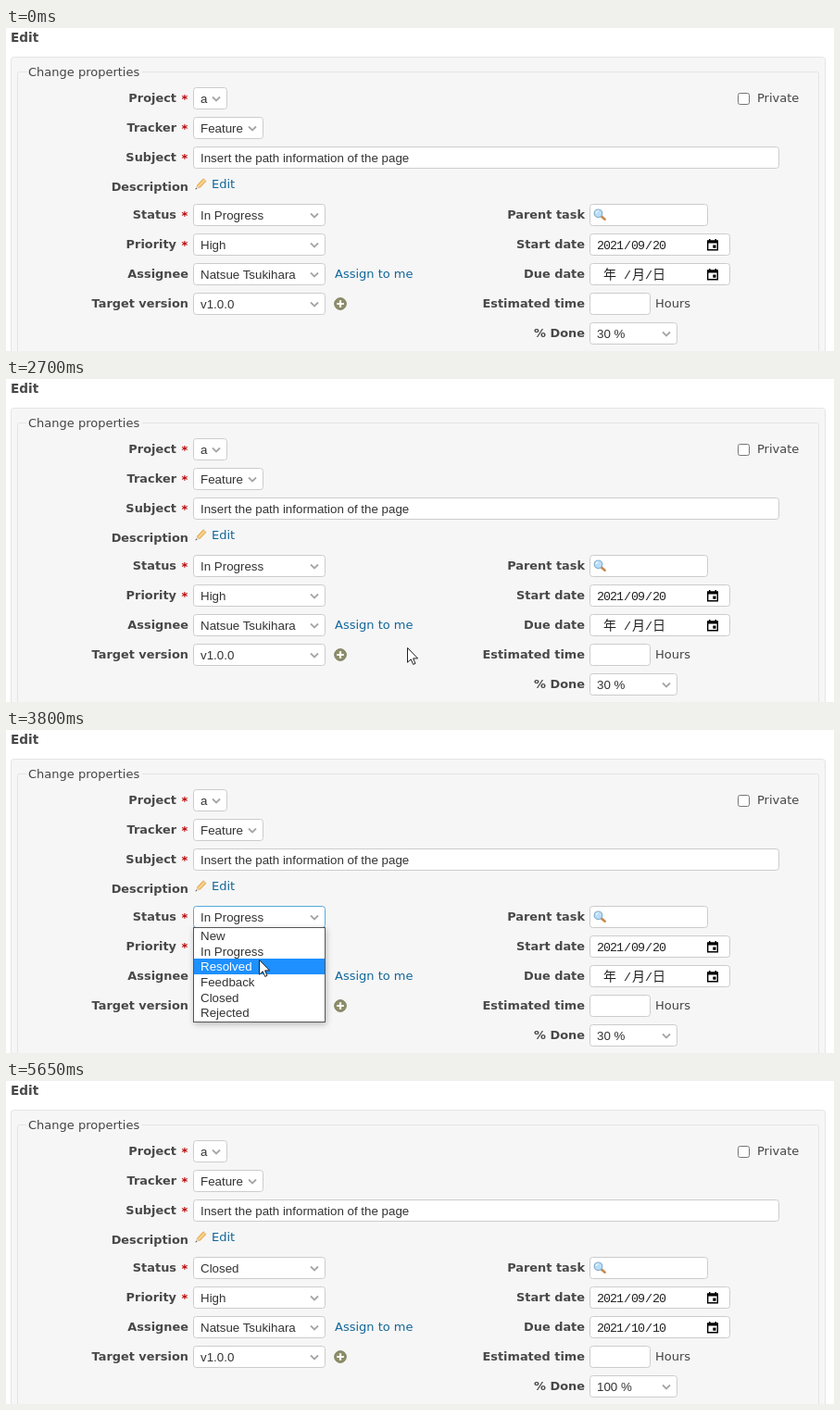
These frames come from a looping animation (894x349 px, 7.05 s). An HTML page:

```html
<!DOCTYPE html>
<html lang="en">
<head>
<meta charset="utf-8">
<title>Edit form</title>
<style>
  html, body { margin: 0; width: 100%; height: 100%; overflow: hidden; background: #fff; }
  svg { display: block; }
  text { white-space: pre; }
  .ui { font: 13px "DejaVu Sans", sans-serif; fill: #444; }
  .label { font: bold 12.9px "DejaVu Sans", sans-serif; fill: #484848; text-anchor: end; }
  .star { font: bold 13px "DejaVu Sans", sans-serif; fill: #b00; text-anchor: middle; }
  .title { font: bold 13.6px "DejaVu Sans", sans-serif; fill: #484848; }
  .link { fill: #169; }
  .value { font: 13.333px "Liberation Sans", Arial, sans-serif; fill: #333; }
  .date { font: 13.333px "Liberation Mono", monospace; letter-spacing: -1px; fill: #222; }
  .kanji { font: 14px "Noto Sans CJK JP", "Noto Sans CJK", sans-serif; fill: #222; }
  .box { fill: #fff; stroke: #ccc; }
  .box.focus { stroke: #5ad; }
  .panel { fill: #f6f6f6; stroke: #e4e4e4; }
  #menu rect.list { fill: #fff; stroke: #555; filter: drop-shadow(1px 2px 3px rgba(0, 0, 0, .25)); }
  #bar { fill: #1e90ff; }
  .value.on { fill: #fff; }
</style>
</head>
<body>
<svg width="894" height="349" viewBox="0 0 894 349">
  <defs>
    <path id="chevron" d="M-4-2 0 2 4-2" fill="none" stroke="#a6a6a6" stroke-width="1.8"/>
    <g id="calendar">
      <path d="M.7 2.7H11.3V12.3H.7Z" fill="none" stroke="#000" stroke-width="1.4"/>
      <path d="M0 2H12V5H0ZM2 .5H3.5V2H2ZM8.5 .5H10V2H8.5ZM6.3 7H9.5V10.2H6.3Z"/>
    </g>
  </defs>

  <text class="title" x="5" y="15">Edit</text>
  <rect class="panel" x="5.5" y="31.5" width="879" height="340" rx="3"/>
  <rect class="panel" x="12.5" y="47.5" width="865" height="320" rx="2"/>
  <path d="M22 44H147V51H22Z" fill="#f6f6f6"/>
  <text class="ui" x="24" y="52">Change properties</text>

  <g id="form"></g>

  <rect x="790.5" y="70.5" width="12" height="12" rx="2" fill="#fff" stroke="#767676"/>
  <text class="ui" x="811" y="80">Private</text>

  <g>
    <path d="M206.2 170.2 213 162.8 216 165.6 209 172.8Z" fill="#f3c26a" stroke="#d99a4e" stroke-width=".7"/>
    <path d="M207.6 171.5 214.5 164.2" stroke="#fbe6ae"/>
    <path d="M206.2 170.2 209 172.8 204.6 174.3Z" fill="#e8cfae"/>
    <path d="M205.2 172.6 206.3 173.7 204.4 174.5Z" fill="#555"/>
  </g>
  <text class="ui link" x="222" y="173">Edit</text>
  <text class="ui link" x="355" y="270">Assign to me</text>
  <text class="ui" x="701" y="302">Hours</text>

  <circle cx="361" cy="298" r="6.4" fill="#8d8d68" stroke="#77775a" stroke-width=".8"/>
  <path d="M361 294.2V301.8M357.2 298H364.8" stroke="#fff" stroke-width="2.2"/>

  <path d="M642.8 203.5 646.6 206.7" stroke="#c68a4c" stroke-width="2.6" stroke-linecap="round"/>
  <circle cx="639.5" cy="200.3" r="4.3" fill="#b9defa" stroke="#86aecb" stroke-width="1.2"/>
  <path d="M637 200A2.6 2.6 0 0 1 639.6 197.7" fill="none" stroke="#fff"/>

  <use href="#calendar" x="757" y="227.5"/>
  <use href="#calendar" x="757" y="259.5"/>
  <g class="date">
    <text y="239"><tspan x="638">2021</tspan><tspan x="667">/</tspan><tspan x="675">09</tspan><tspan x="690">/</tspan><tspan x="698">20</tspan></text>
    <text y="271"><tspan x="667">/</tspan><tspan x="690">/</tspan></text>
    <text y="271" id="dueSet"><tspan x="638">2021</tspan><tspan x="675">10</tspan><tspan x="698">10</tspan></text>
  </g>
  <text class="kanji" y="271" id="dueEmpty"><tspan x="645">年</tspan><tspan x="676">月</tspan><tspan x="698">日</tspan></text>

  <g id="menu">
    <rect class="list" x="202.5" y="213.5" width="142" height="102"/>
    <rect id="bar" x="203" width="141" height="17"/>
  </g>

  <path id="cursor" d="M.5 .5V16.2L4.2 12.8 6.7 18.4 9 17.4 6.6 11.9H11.6Z" fill="#fff" stroke="#222" stroke-linejoin="round"/>
</svg>

<script>
const LOOP = 7050, OPEN = 3340, CLOSE = 4730, FILL = 4800, BLUR = 4870;
const ROW = 16.6, LIST_TOP = 214.5;
const $ = id => document.getElementById(id);

function add(parent, tag, attrs, text = '') {
  const el = document.createElementNS('http://www.w3.org/2000/svg', tag);
  for (const k in attrs) el.setAttribute(k, attrs[k]);
  el.textContent = text;
  return parent.appendChild(el);
}

// Each field: label, baseline, box left, top, width, value, kind, required
const form = $('form');
function field(label, base, x, y, w, value, kind, required) {
  const right = x > 400 ? 625 : required ? 184 : 197;
  add(form, 'text', { class: 'label', x: right, y: base }, label);
  if (required) add(form, 'text', { class: 'star', x: 193, y: base + 1 }, '*');
  if (!w) return {};
  const box = add(form, 'rect', { class: 'box', x: x + .5, y: y + .5, width: w - 1, height: 23, rx: 3 });
  if (kind === 'select') add(form, 'use', { href: '#chevron', x: x + w - 12, y: y + 12.5 });
  const text = add(form, 'text', { class: 'value', x: x + 8, y: y + 17 }, value);
  return { box, text };
}
field('Project', 80, 202, 64, 37, 'a', 'select', true);
field('Tracker', 112, 202, 96, 76, 'Feature', 'select', true);
field('Subject', 144, 202, 128, 633, 'Insert the path information of the page', 'input', true);
field('Description', 176, 202);
const status = field('Status', 206, 202, 190, 143, 'In Progress', 'select', true);
field('Priority', 238, 202, 222, 143, 'High', 'select', true);
field('Assignee', 270, 202, 254, 143, 'Natsue Tsukihara', 'select');
field('Target version', 302, 202, 286, 143, 'v1.0.0', 'select');
field('Parent task', 206, 630, 190, 128);
field('Start date', 238, 630, 222, 152);
field('Due date', 270, 630, 254, 152);
field('Estimated time', 302, 630, 286, 66);
const done = field('% Done', 334, 630, 318, 95, '30 %', 'select');

const options = ['New', 'In Progress', 'Resolved', 'Feedback', 'Closed', 'Rejected'].map((name, i) =>
  add($('menu'), 'text', { class: 'value', x: 210, y: Math.round(227.2 + i * ROW) }, name));

// Pointer strokes: start, end, then evenly timed stops
const strokes = [
  [220, 530, [[781, 338], [765, 318], [746, 300], [729, 288], [718, 281]]],
  [680, 1370, [[732, 283], [747, 274], [753, 261], [741, 249], [713, 243], [675, 244], [638, 250], [611, 260], [602, 272], [607, 283]]],
  [1450, 2150, [[614, 302], [643, 322], [686, 335], [725, 335], [741, 318], [730, 298], [700, 286], [670, 290], [666, 305], [689, 315]]],
  [2230, 2380, [[699, 322], [707, 336], [709, 370]]],
  [2550, 3080, [[681, 340], [548, 318], [433, 290], [368, 262], [330, 240], [308, 222], [296, 213], [292, 209]]],
  [3570, 4030, [[291, 212], [287, 219], [281, 232], [273, 248], [265, 264], [257, 278], [254, 285]]],
  [5180, 5650, [[262, 287], [300, 293], [375, 304], [470, 317], [575, 331], [656, 345], [700, 370]]],
];
const SLACK = 8;

function pointer(t) {
  const stroke = strokes.filter(s => s[0] <= t).pop();
  if (!stroke) return [0, 400];
  const [start, end, stops] = stroke, last = stops.length - 1;
  return stops[Math.min(last, Math.floor((t - start + SLACK) / (end - start) * last))];
}

const show = (el, on) => el.setAttribute('visibility', on ? 'visible' : 'hidden');

function draw(t) {
  const [x, y] = pointer(t);
  $('cursor').setAttribute('transform', `translate(${x} ${y})`);

  show($('menu'), t >= OPEN && t < CLOSE);
  const row = y < LIST_TOP ? 1 : Math.floor((y - LIST_TOP) / ROW);
  $('bar').setAttribute('y', Math.round(LIST_TOP + row * ROW - .5));
  options.forEach((o, i) => o.classList.toggle('on', i === row));

  status.box.classList.toggle('focus', t >= OPEN && t < BLUR);
  status.text.textContent = t < CLOSE ? 'In Progress' : 'Closed';
  done.text.textContent = t < FILL ? '30 %' : '100 %';
  show($('dueEmpty'), t < FILL);
  show($('dueSet'), t >= FILL);
}

const origin = performance.now();
function tick() {
  draw((performance.now() - origin) % LOOP);
  requestAnimationFrame(tick);
}
tick();
</script>
</body>
</html>
```
